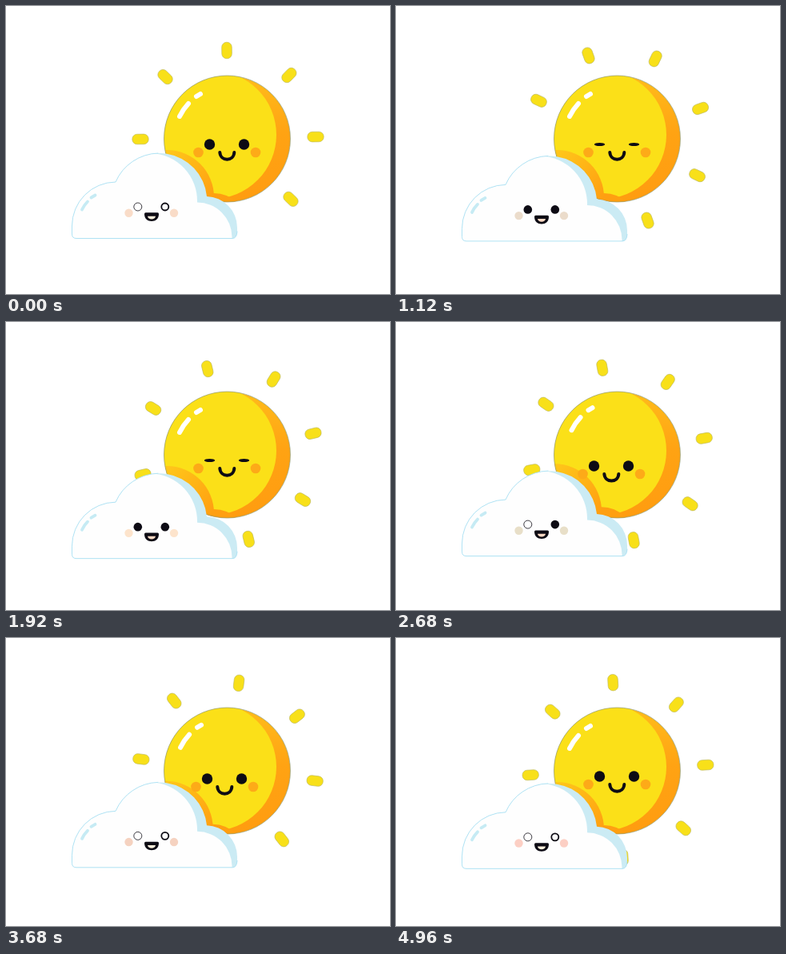
Write an HTML page that moves like this. It is 480 px wide and 360 px high and loops after 5 s.

```html
<!DOCTYPE html>
<html lang="en">
<head>
<meta charset="utf-8">
<title>Sun and cloud</title>
<style>
  html, body { margin: 0; width: 100%; height: 100%; overflow: hidden; background: #fff; }
  svg { display: block; width: 100vw; height: 100vh; }
  .line { fill: none; stroke-linecap: round; stroke-linejoin: round; }
</style>
</head>
<body>
<svg viewBox="0 0 480 360">
  <defs>
    <linearGradient id="shade" x1="0" y1="0" x2="0" y2="1">
      <stop offset="0" stop-color="#ffbc1b"/>
      <stop offset=".45" stop-color="#ffa313"/>
      <stop offset="1" stop-color="#ff9c10"/>
    </linearGradient>
    <linearGradient id="cast" gradientUnits="userSpaceOnUse" x1="205" y1="180" x2="262" y2="236">
      <stop offset="0" stop-color="#ffc61a"/>
      <stop offset="1" stop-color="#ff9f11"/>
    </linearGradient>
    <clipPath id="disc"><circle cx="276.5" cy="166" r="79"/></clipPath>
    <clipPath id="puff"><use href="#body"/></clipPath>
  </defs>

  <g id="rays" fill="#f8e019" stroke="#b9b65a" stroke-width=".6"></g>

  <g clip-path="url(#disc)">
    <circle cx="276.5" cy="166" r="79" fill="url(#shade)"/>
    <circle cx="258" cy="161" r="80" fill="#fbe018"/>
    <g id="shadow" fill="url(#cast)">
      <circle cx="201" cy="239" r="59"/>
      <circle cx="260" cy="275" r="41"/>
    </g>
    <path id="glint" class="line" stroke="#fff" stroke-width="6" d="M217 138Q221 129.5 228 122M238 113L243 110"/>
  </g>
  <circle cx="276.5" cy="166" r="79" fill="none" stroke="#8f9a72" stroke-width=".7"/>

  <g id="sunFace">
    <g fill="#fdaa18"><circle cx="240.5" cy="183" r="6.3"/><circle cx="312" cy="183" r="6.3"/></g>
    <g fill="#0d0b14">
      <ellipse class="sunEye" cx="254.5" cy="173" rx="6.7"/>
      <ellipse class="sunEye" cx="297.5" cy="173" rx="6.7"/>
    </g>
    <path class="line" stroke="#0d0b14" stroke-width="4" d="M267.3 183C268 194.5 284.7 194.5 285.3 183"/>
  </g>

  <g id="cloud">
    <path id="body" fill="#cbebf4" d="M88 290.5Q82.5 290.5 82.5 285V275A55 55 0 0 1 137 220A59.6 59.6 0 0 1 251 238A39 39 0 0 1 289 277V282Q288.5 290.5 283 290.5Z"/>
    <path clip-path="url(#puff)" fill="#fefefe" d="M80 292V180H181V184A59.8 59.8 0 0 1 239 245.5A43.5 43.5 0 0 1 282.5 289V292Z"/>
    <path class="line" stroke="#a9e0f3" stroke-width=".9" d="M190 184A59.6 59.6 0 0 0 137 220A55 55 0 0 0 82.5 275V285Q82.5 290.5 88 290.5H283Q288.5 290.5 289 282"/>
    <path class="line" stroke="#c6ebf4" stroke-width="3.8" d="M95 254.5Q97.5 249 102 244.5M106.5 239.5L111.5 236.5"/>
    <g id="blush"><circle cx="153.5" cy="258.7" r="5.2"/><circle cx="210" cy="258.7" r="5.2"/></g>
    <circle id="eyeL" cx="164.8" cy="251"/>
    <circle id="eyeR" cx="198.8" cy="251"/>
    <path fill="#0d0b14" d="M174.5 258.3H189.5Q191 258.3 191 260C191 266 187 269 182 269S173 266 173 260Q173 258.3 174.5 258.3Z"/>
    <path id="tongue" d="M177 262.7H187C186.5 265.2 184.7 266.4 182 266.4S177.500 265.2 177 262.7Z"/>
  </g>
</svg>
<script>
const LOOP = 5000, STEP = 40;
const HUB = '277.5 165';
const $ = id => document.getElementById(id);
const set = (el, attrs) => { for (const k in attrs) el.setAttribute(k, attrs[k]); };
const move = (el, x, y) => el.setAttribute('transform', `translate(${x} ${y})`);

// Tables of [ms, value]
const bob = [[0, 0], [1850, 5.2], [4000, -4.2], [7200, 5.2]];
const look = [[0, 0], [2000, 0], [2760, 7.2], [3280, 7.2], [4000, 0], [5000, 0]];
const lid = [[0, 6.7], [840, 6.7], [1000, 2], [2000, 2], [2160, 6.7], [5000, 6.7]];
const blushTint = [[0, '#f9dcc8'], [600, '#ebdccb'], [1500, '#fde4cc'], [2300, '#e8dfc8'], [3200, '#f5d2c0'], [4000, '#fccfc4']];

function eased(keys, t) {
  const i = keys.findIndex(k => k[0] > t);
  const [t0, a] = keys[i - 1], [t1, b] = keys[i];
  const u = (t - t0) / (t1 - t0);
  return a + (b - a) * u * u * (3 - 2 * u);
}
const held = (keys, t) => keys.filter(k => k[0] <= t).pop()[1];

const svgNS = 'http://www.w3.org/2000/svg';
for (let i = 0; i < 8; i++) {
  const ray = document.createElementNS(svgNS, 'rect');
  set(ray, { x: 271.2, y: 45.3, width: 12.6, height: 20.4, rx: 6, transform: `rotate(${i * 45} ${HUB})` });
  $('rays').append(ray);
}
const sunEyes = document.querySelectorAll('.sunEye');

function paintEye(eye, solid, line) {
  set(eye, solid
    ? { r: 5.3, fill: '#0d0b14', stroke: 'none' }
    : { r: 5.4 - line / 2, fill: '#fff', stroke: '#0d0b14', 'stroke-width': line });
}

function draw(t) {
  // Steady spin with a slight sway
  const turn = t / LOOP * 315 + .8 * Math.cos((t - 2700) / LOOP * 2 * Math.PI);
  $('rays').setAttribute('transform', `rotate(${turn} ${HUB})`);

  const d = eased(look, t);
  move($('sunFace'), -d, d);
  move($('glint'), d * .36, -d * .4);
  move($('shadow'), -d * .43, -d * .4);
  const ry = eased(lid, t);
  sunEyes.forEach(eye => eye.setAttribute('ry', ry));

  move($('cloud'), 0, eased(bob, t));
  $('blush').setAttribute('fill', held(blushTint, t));
  const awake = t > 560;
  paintEye($('eyeL'), awake && t < 2300, .8);
  paintEye($('eyeR'), awake && t < 3200, 1.8);
  $('tongue').setAttribute('fill', awake && t < 3200 ? '#fbd9c4' : '#fbf0dc');
}

const start = performance.now();
function tick() {
  const t = (performance.now() - start) % LOOP;
  draw(Math.floor(t / STEP) * STEP);
  requestAnimationFrame(tick);
}
tick();
</script>
</body>
</html>
```
